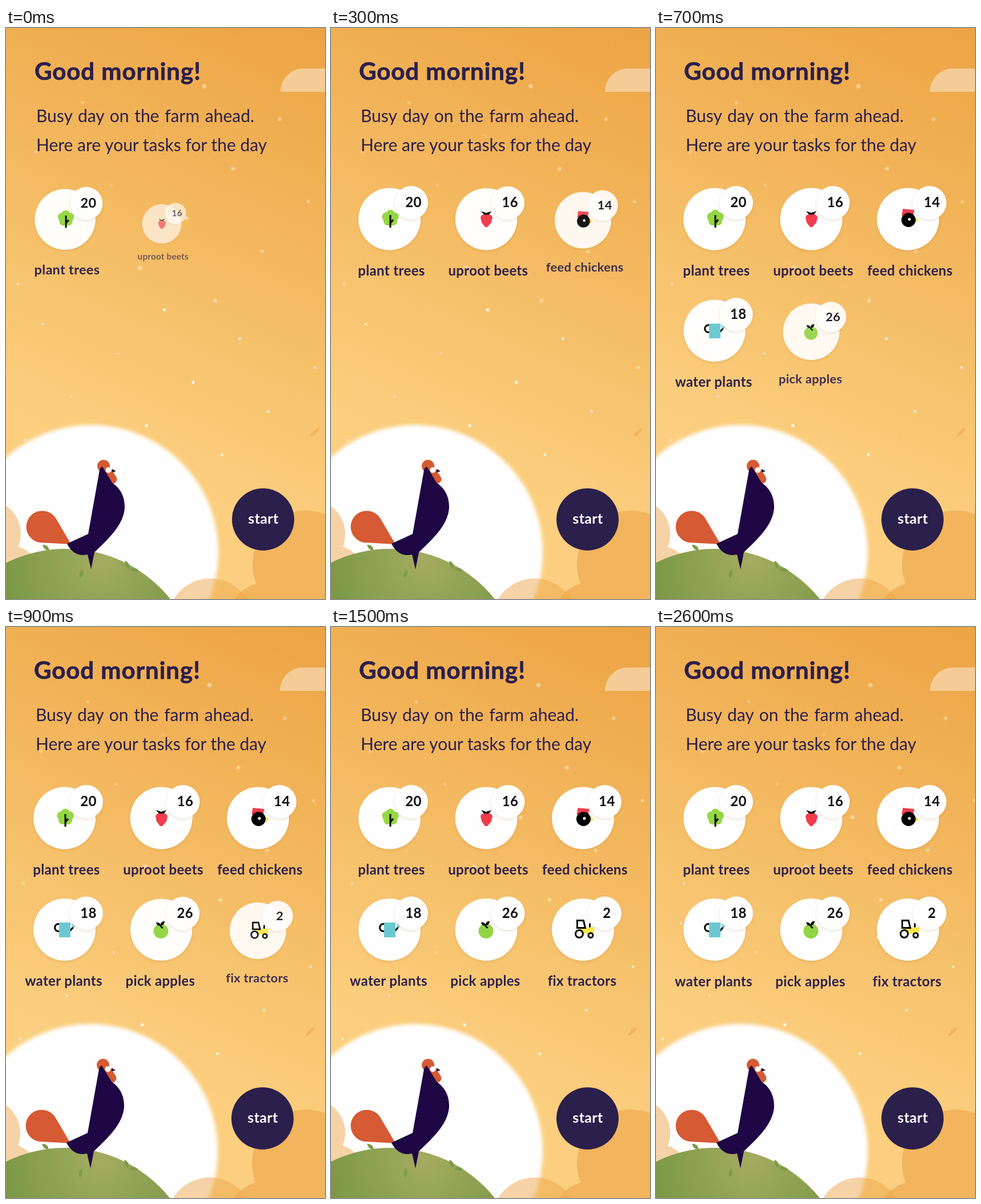
These frames come from a looping animation (559 px wide and 1001 px high, 2.7 s). An HTML page:

```html
<!DOCTYPE html>
<html lang="en">
<head>
<meta charset="utf-8">
<title>Farm tasks</title>
<style>
html, body { margin: 0; width: 100%; height: 100%; overflow: hidden; background: #f3b65f; }
svg { display: block; width: 559px; height: 1001px; }
text { font-family: Lato, "Open Sans", sans-serif; fill: #2b1f4b; }
.title { font-size: 42px; font-weight: 700; letter-spacing: .95px; stroke: #2b1f4b; stroke-width: .7; }
.body { font-size: 30px; }
.label { font-size: 24px; font-weight: 700; letter-spacing: .35px; text-anchor: middle; }
.num { fill: #0d0b12; }
.item > * { opacity: var(--s); }
.disc { fill: #fffefe; filter: drop-shadow(0 2px 2px rgba(150, 90, 20, .16)); }
.ink { fill: none; stroke: #000; stroke-width: 3; }
</style>
</head>
<body>
<svg viewBox="0 0 559 1001">
  <defs>
    <linearGradient id="sky" gradientUnits="userSpaceOnUse" x1="500" y1="-10" x2="170" y2="740">
      <stop offset="0" stop-color="#eda444"/>
      <stop offset=".6" stop-color="#f5be67"/>
      <stop offset="1" stop-color="#fbcf7f"/>
    </linearGradient>
    <radialGradient id="grass" gradientUnits="userSpaceOnUse" cx="165" cy="935" r="175">
      <stop offset="0" stop-color="#a4ac60"/>
      <stop offset="1" stop-color="#7a9846"/>
    </radialGradient>
    <filter id="soft"><feGaussianBlur stdDeviation="3"/></filter>
    <filter id="haze" x="-1" y="-1" width="3" height="3"><feGaussianBlur stdDeviation=".9"/></filter>
    <path id="leaf" d="M-8 0Q0 -7 8 0Q0 6 -8 0Z"/>
  </defs>
  <rect width="559" height="1001" fill="url(#sky)"/>
  <g id="scene">
    <g id="dust" fill="#fff3d6" filter="url(#haze)"></g>
    <g id="drift" fill="#fff">
      <use href="#leaf" transform="translate(540 709) rotate(-44) scale(1.5 .9)" fill="#efad55" opacity=".75"/>
    </g>
    <path d="M480 112A40 41 0 0 1 520 71H570V112Z" fill="#f5cc96"/>
    <g fill="#f2b45c">
      <circle cx="525" cy="940" r="94"/>
      <circle cx="455" cy="1040" r="68"/>
    </g>
    <circle cx="148" cy="919" r="223" fill="#fffefe" filter="url(#soft)"/>
    <g fill="#eda84e" opacity=".5">
      <circle cx="-35" cy="887" r="60"/>
      <circle cx="5" cy="960" r="53"/>
      <circle cx="357" cy="1040" r="75"/>
    </g>
    <circle cx="104" cy="1147" r="234" fill="url(#grass)"/>
    <g fill="#7b9c48">
      <use href="#leaf" transform="translate(69 911) rotate(42)"/>
      <use href="#leaf" transform="translate(131 957) rotate(-80)"/>
      <use href="#leaf" transform="translate(211 941) rotate(66)"/>
      <use href="#leaf" transform="translate(224 950) rotate(10)"/>
    </g>
    <g fill="#d65a33">
      <path d="M113 905L58 902A28 28 0 1 1 86 859Z"/>
      <circle cx="170" cy="768" r="11"/>
      <path d="M172 770L186 791" stroke="#d65a33" stroke-width="15" stroke-linecap="round"/>
    </g>
    <path d="M168 769L185 797C201 808 207 823 207 840C206 868 183 892 154 919L148 949L142 923C126 927 113 919 106 904L143 887L163 775Q164 770 168 769Z" fill="#1e0744"/>
    <circle cx="178.500" cy="775" r="5" fill="#fff"/>
    <path d="M185 773L192 777L185 779Z" fill="#160c2a"/>

    <text class="title" x="49" y="91">Good morning!</text>
    <text class="body" x="52" y="165" word-spacing="2">Busy day on the farm ahead.</text>
    <text class="body" x="52" y="216">Here are your tasks for the day</text>
    <g id="items"></g>
    <circle cx="449.500" cy="861.500" r="54.500" fill="#2b1f4b"/>
    <text class="label" x="450" y="869" style="fill:#fff;font-size:25px">start</text>
  </g>
</svg>
<script>
const $ = id => document.getElementById(id);
const WIDTH = 559, LOOP = 2700, STEP = 100, GOLDEN = .618;
const frac = v => v % 1;
const repeat = (n, draw) => Array.from({ length: n }, (_, i) => draw(i)).join('');

// Specks spread evenly from top to bottom, golden-ratio steps across.
const specks = (n, start, top, bottom, size, alpha) => repeat(n, i => {
  const x = WIDTH * frac(start + i * GOLDEN);
  const y = top + (bottom - top) * i / (n - 1);
  const near = frac(.9 + i * .37);
  return `<circle cx="${x}" cy="${y}" r="${size + near}" opacity="${alpha + near * .4}"/>`;
});
$('dust').innerHTML = specks(14, .62, 102, 478, 2.5, .25);
$('drift').innerHTML += specks(11, .495, 494, 748, 1.8, .5);

const crown = repeat(5, i => {
  const a = Math.PI * (.4 * i - .5);
  return `<circle cx="${1.5 + 7.5 * Math.cos(a)}" cy="${-2 + 7 * Math.sin(a)}" r="7.5"/>`;
});
const icons = {
  tree: `<g fill="#96d645">${crown}</g>
    <path class="ink" d="M1.500 -7V15M1.500 7L6.500 1"/>`,
  beet: `<path d="M-10 -3Q-9 -9 0 -8Q10 -9 11 -3L9 6L2 14H-2L-8 6Z" fill="#f23c4d"/>
    <path d="M-9 -14L0 -11L9 -14L5 -8H-4Z"/>`,
  hen: `<path d="M-9 -18L11 -16L9 -4L-11 -6Z" fill="#f23c4d"/>
    <path d="M13 -3L19 2L13 7Z" fill="#f7e04b"/>
    <circle cx="1" cy="1.500" r="12.500"/><circle cx="2.500" cy=".5" r="2.500" fill="#fff"/>`,
  can: `<circle class="ink" cx="-10.500" cy="-3.500" r="6.500"/>
    <path class="ink" d="M9 3L15 -4"/>
    <path d="M-9.500 -12.500H10.500V13.500H-9.500ZM11 -11L19 -6L16 -3Z" fill="#6cc8d0"/>`,
  apple: `<circle cx="-.5" cy="2.500" r="13" fill="#92d444"/>
    <path d="M-9 -13Q-2 -13 -1 -8Q-1 -15 6 -15Q6 -9 0 -7L4 -3L1 -2L-3 -7Q-8 -7 -9 -13Z"/>`,
  tractor: `<path d="M-8 -4H20V4L14 7H-4Z" fill="#f7e64b"/>
    <path class="ink" d="M-10 -3V-16H1L4 -3ZM12 -11V-4"/>
    <g class="ink"><circle cx="-6.500" cy="7.500" r="6.500" fill="#fff"/>
    <circle cx="13.500" cy="10" r="4" fill="#fff"/></g>`
};

const tasks = [
  ['tree', 20, 'plant trees'], ['beet', 16, 'uproot beets'], ['hen', 14, 'feed chickens'],
  ['can', 18, 'water plants'], ['apple', 26, 'pick apples'], ['tractor', 2, 'fix tractors']
];
$('items').innerHTML = tasks.map(([icon, count, label], i) => `<g class="item">
  <circle class="disc" r="54.500"/><g>${icons[icon]}</g>
  <circle class="disc" cx="38" cy="-28.500" r="29.500"/>
  <text class="label num" x="42" y="-21">${count}</text>
  <text class="label" x="${i < 3 ? 3.5 : -1.5}" y="99">${label}</text></g>`).join('');
const items = [...$('items').children];

const move = (el, x) => el.setAttribute('transform', `translate(${x} 0)`);

function draw(t) {
  move($('scene'), Math.max(0, 1 - t / 200));
  move($('dust'), t * .0112);
  move($('drift'), t * -.0076);
  items.forEach((el, i) => {
    const age = t - 200 * (i - 1);
    const s = Math.max(0, 1 - .365 * .25 ** (age / 100));
    const x = 102.5 + i % 3 * 169.5, y = i < 3 ? 335 : 530.5;
    // each task grows about a point just below its disc centre
    el.setAttribute('transform', `translate(${x} ${y + 23 * (1 - s)}) scale(${s})`);
    el.style.setProperty('--s', s);
    el.style.display = s ? '' : 'none';
  });
}

const start = performance.now();
function tick() {
  const t = (performance.now() - start) % LOOP;
  draw(Math.floor(t / STEP) * STEP);
  requestAnimationFrame(tick);
}
tick();
</script>
</body>
</html>
```
